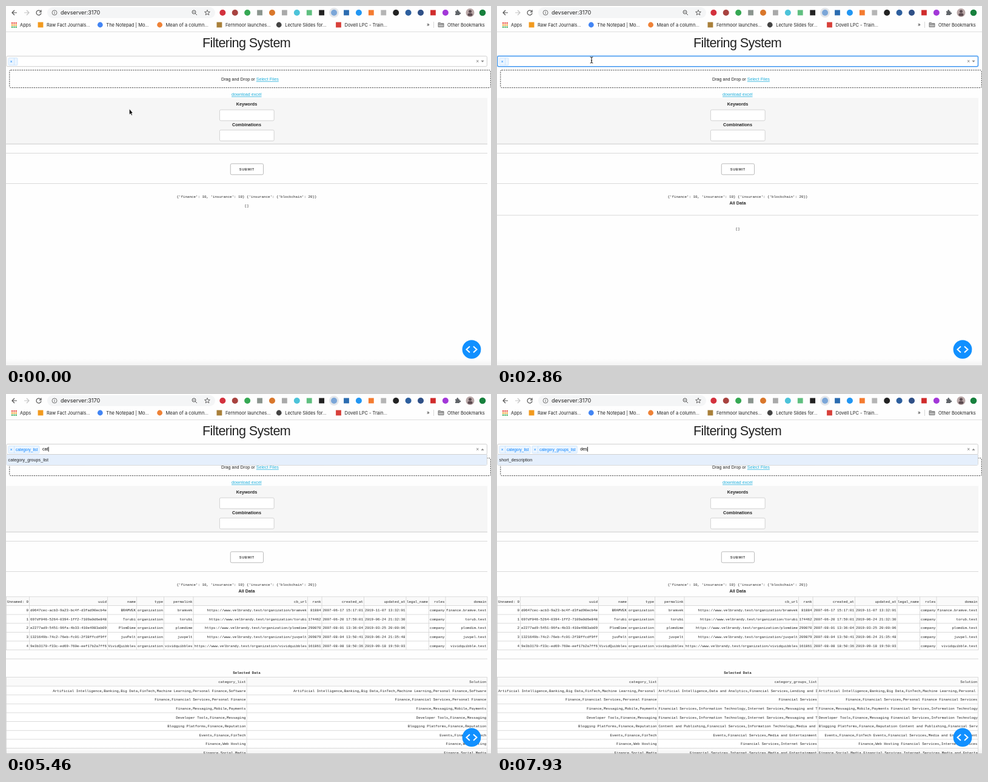
An HTML page with a canvas for the animation above (8 s loop, 800 px wide and 593 px high).

```html
<!DOCTYPE html>
<html lang="en">
<head>
<meta charset="utf-8">
<title>Filtering System</title>
<style>
html, body { margin: 0; width: 100%; height: 100%; overflow: hidden; background: #fff; }
canvas { display: block; width: 800px; height: 593px; }
</style>
</head>
<body>
<canvas id="stage"></canvas>
<script>
const W = 800, H = 593, LOOP = 8000, STEP = 130;
const SANS = '"Liberation Sans", Arial, sans-serif';
const MONO = '"Liberation Mono", "Courier New", monospace';
const UI = 'Inter, Roboto, sans-serif';
const BLUE = '#007eff', LINK = '#1eaedb', INK = '#222';
const ROW = 14.62, MONO_SIZE = 5.84;

const canvas = document.getElementById('stage');
const ctx = canvas.getContext('2d');
const ratio = window.devicePixelRatio || 1;
canvas.width = W * ratio;
canvas.height = H * ratio;

// ---------- drawing helpers ----------
function text(str, x, y, size, { font = SANS, color = INK, align = 'left', weight = 400, spacing = 0 } = {}) {
  ctx.font = `${weight} ${size}px ${font}`;
  ctx.fillStyle = color;
  ctx.textAlign = align;
  ctx.letterSpacing = spacing + 'px';
  ctx.fillText(str, x, y + size * 0.35);
  const width = ctx.measureText(str).width;
  ctx.letterSpacing = '0px';
  return width;
}

function rect(x, y, w, h, fill) {
  ctx.fillStyle = fill;
  ctx.fillRect(x, y, w, h);
}

function box(x, y, w, h, r, fill, stroke, width = 1) {
  ctx.beginPath();
  ctx.roundRect(x, y, w, h, r);
  if (fill) { ctx.fillStyle = fill; ctx.fill(); }
  if (stroke) { ctx.strokeStyle = stroke; ctx.lineWidth = width; ctx.stroke(); }
}

function disc(x, y, r, fill) {
  ctx.beginPath();
  ctx.arc(x, y, r, 0, Math.PI * 2);
  ctx.fillStyle = fill;
  ctx.fill();
}

function path(d, x, y, { fill, stroke, width = 1.2 } = {}) {
  const shape = new Path2D(d);
  ctx.save();
  ctx.translate(x, y);
  if (fill) { ctx.fillStyle = fill; ctx.fill(shape); }
  if (stroke) { ctx.strokeStyle = stroke; ctx.lineWidth = width; ctx.stroke(shape); }
  ctx.restore();
}

const rule = (y, color = '#d9d9d9') => rect(0, y, 794, 1, color);

function link(str, x, y) {
  const w = text(str, x, y, 7.2, { color: LINK });
  rect(x, y + 3.4, w, 0.7, LINK);
}

// ---------- browser bar ----------
const EXTENSIONS = [
  ['#d3313d', 0], ['#a8423f', 0], ['#35a853', 0], ['#8b958f', 1], ['#d9772b', 0], ['#a9a9a9', 1],
  ['#4cc3d9', 0], ['#5fbf7f', 1], ['#222', 1], ['#7ba6d8', 0], ['#2b6cb0', 1], ['#2196f3', 0],
  ['#f47b30', 1], ['#b5b5b5', 1], ['#222', 0], ['#2d5f9e', 0], ['#2f4f86', 0], ['#d02c2c', 1],
  ['#a237d8', 0]
];
const BOOKMARKS = [
  ['Raw Fact Journals...', '#f29a1f', 1],
  ['The Notepad | Mo...', '#4285f4', 0],
  ['Mean of a column...', '#ef8236', 0],
  ['Fernmoor launches...', '#a9803a', 1],
  ['Lecture Slides for...', '#444', 0],
  ['Dovell LPC - Train...', '#d8403a', 1]
];

function mark(x, y, color, square, r) {
  if (square) rect(x - r, y - r, 2 * r, 2 * r, color);
  else disc(x, y, r, color);
}

function drawBrowser() {
  const gray = { stroke: '#555', width: 1.2 };
  path('M4 0H-4M0-4L-4 0L0 4', 14, 11, gray);
  path('M-4 0H4M0-4L4 0L0 4', 34, 11, { stroke: '#c4c4c4' });
  path('M3.2-2.4A4 4 0 1 0 4 .6M4-4.4V-1.2H.8', 54, 11, gray);
  box(68, 2, 277, 18, 9, '#f4f5f6');
  path('M4 0A4 4 0 1 1-4 0A4 4 0 1 1 4 0M0-.8V2.2M0-2.3V-1.3', 80, 11, { stroke: '#666', width: 0.9 });
  text('devserver:3170', 90, 11, 9, { font: UI });
  path('M2-1A3 3 0 1 1-4-1A3 3 0 1 1 2-1M1.2 1.2L4 4M-2.4-1H.4', 311, 11, { stroke: '#555', width: 1 });
  path('M0-4.5L1.2-1.4L4.4-1.3L1.9.7L2.8 3.8L0 2L-2.8 3.8L-1.9.7L-4.4-1.3L-1.2-1.4Z', 332, 11,
    { stroke: '#555', width: 0.9 });

  disc(541, 11, 8, '#e3e6ea');
  EXTENSIONS.forEach(([color, square], i) => mark(357.3 + i * 20.42, 11, color, square, square ? 4.4 : 5));
  path('M-4-2H-1.5A1.5 1.5 0 1 1 1-2H3V.2A1.5 1.5 0 1 1 3 2.8V4.5H-4V2.5A1.5 1.5 0 0 0-4-.2Z', 745, 10.5,
    { fill: '#5f6368' });
  disc(765.5, 11, 7, '#b9a7a7');
  disc(765.5, 9, 2.5, '#5c4b50');
  box(761.5, 12, 8, 4.5, 2.5, '#5c4b50');
  disc(786, 11, 5.3, '#17803d');

  const dots = ['#ea4335', '#f29a1f', '#34a853'];
  for (let i = 0; i < 9; i++) rect(9 + (i % 3) * 3.3, 27 + Math.floor(i / 3) * 3.3, 2.2, 2.2, dots[Math.floor(i / 3)]);
  text('Apps', 23, 31, 7.5, { font: UI });
  BOOKMARKS.forEach(([label, color, square], i) => {
    const x = 57 + i * 98.3;
    mark(x, 31, color, square, 4.4);
    text(label, x + 10, 31, 7.5, { font: UI });
  });
  text('»', 694, 30.5, 8, { font: UI });
  rect(705, 26, 0.8, 10, '#ccc');
  path('M-4.5-3.5H-1L0-2.3H4.5V3.5H-4.5ZM-4.5-1H4.5', 717.5, 31, { fill: '#bbb', stroke: '#666', width: 0.8 });
  text('Other Bookmarks', 728, 31, 7.5, { font: UI });
  rect(0, 42, W, 1, '#dedede');
}

// ---------- page data ----------
const COLUMNS = ['Unnamed: 0', 'uuid', 'name', 'type', 'permalink', 'cb_url', 'rank',
  'created_at', 'updated_at', 'legal_name', 'roles', 'domain'];
const OPTIONS = [...COLUMNS, 'category_list', 'category_groups_list', 'short_description'];
const EDGES = [0.5, 38.5, 167.5, 215.5, 260.5, 309, 497.5, 521, 590.5, 660, 697.5, 725, 794];
const COMPANIES = [
  ['d0647cec-acb3-9a23-bc4f-d3fad90ecb4e', 'BRAMVEK', '81884', '2007-06-17 15:17:01', '2019-11-07 13:32:01', 'finance.bramve.test'],
  ['697df046-5264-0394-1ff2-7109a0d6e848', 'Torubi', '174462', '2007-06-20 17:59:01', '2019-06-24 21:32:30', 'torub.test'],
  ['e2277ad9-5451-96fa-4b33-410e4983ab09', 'PlomDime', '290070', '2007-08-01 13:36:04', '2019-03-25 20:00:06', 'plomdim.test'],
  ['1321649b-74c2-76eb-fc01-2f38ffcdf9ff', 'juvPelt', '209879', '2007-08-04 13:50:41', '2019-06-24 21:35:48', 'juvpel.test'],
  ['9e3b3170-f33c-ed69-760e-eef17b2a7ff6', 'VividQuibbles', '161861', '2007-08-08 18:50:36', '2019-09-18 19:50:03', 'vividquibble.test']
];
const COMPANY_ROWS = COMPANIES.map(([uuid, name, rank, created, updated, domain], i) => {
  const slug = name.toLowerCase();
  return [String(i), uuid, name, 'organization', slug, 'https://www.velbrandy.test/organization/' + slug,
    rank, created, updated, '', 'company', domain];
});

const FIN = 'Financial Services', MEDIA = 'Media and Entertainment', NET = 'Internet Services';
const TELECOM = `${FIN},Information Technology,${NET},Messaging and Telecommunications`;
const CATEGORIES = [
  ['Artificial Intelligence,Banking,Big Data,FinTech,Machine Learning,Personal Finance,Software',
    `Artificial Intelligence,Data and Analytics,${FIN},Lending and Investments`],
  ['Finance,Financial Services,Personal Finance', FIN],
  ['Finance,Messaging,Mobile,Payments', TELECOM],
  ['Developer Tools,Finance,Messaging', TELECOM],
  ['Blogging Platforms,Finance,Reputation', `Content and Publishing,${FIN},Information Technology,${MEDIA}`],
  ['Events,Finance,FinTech', `Events,${FIN},${MEDIA}`],
  ['Finance,Web Hosting', `${FIN},${NET}`],
  ['Finance,Social Media', `${FIN},${NET},${MEDIA}`]
];

// ---------- page parts ----------
function cell(str, left, right, y) {
  ctx.save();
  ctx.beginPath();
  ctx.rect(left, y - ROW / 2, right - left - 0.5, ROW);
  ctx.clip();
  ctx.font = `400 ${MONO_SIZE}px ${MONO}`;
  const overflows = ctx.measureText(str).width > right - left - 2;
  text(str, overflows ? left + 1.5 : right - 1.5, y, MONO_SIZE, { font: MONO, align: overflows ? 'left' : 'right' });
  ctx.restore();
}

function table(top, edges, rows) {
  const right = edges[edges.length - 1], height = rows.length * ROW;
  rect(0, top, right, height, '#fff');
  rect(0, top, right, ROW, '#fafafa');
  for (let i = 0; i <= rows.length; i++) rect(0, top + i * ROW - 0.4, right, 0.8, '#d3d3d3');
  edges.forEach(x => rect(x - 0.4, top, 0.8, height, '#d3d3d3'));
  rows.forEach((row, r) => row.forEach((str, c) => cell(str, edges[c], edges[c + 1], top + (r + 0.52) * ROW)));
}

function drawSelected(names) {
  text('Selected Data', 397, 458.7, MONO_SIZE, { font: MONO, weight: 700, align: 'center' });
  const rows = CATEGORIES.map(row => {
    const values = row.slice(0, names.length);
    return [...values, values.join(' ')];
  });
  const count = names.length + 1;
  const edges = Array.from({ length: count + 1 }, (_, i) => 0.5 + i * 793.2 / count);
  table(466.5, edges, [[...names, 'Solution'], ...rows]);
}

function drawDropzone(hover) {
  if (hover) rect(6, 106, 793, 28.5, '#e1e1e1');
  ctx.save();
  ctx.setLineDash(hover ? [] : [2.2, 1.4]);
  box(5.8, 105.6, 793.6, 29, 2, null, hover ? '#5fcc62' : '#333', hover ? 1.1 : 0.9);
  ctx.restore();
  text('Drag and Drop or', 355, 120.7, 7.2);
  link('Select Files', 412.7, 120.7);
}

function tag(label, x) {
  ctx.font = `400 6.48px ${SANS}`;
  const w = label ? ctx.measureText(label).width + 14.6 : 15;
  box(x, 85.5, w, 12, 1.2, '#ebf5ff', '#c2e0ff', 0.7);
  rect(x + 9, 85.5, 0.7, 12, '#c2e0ff');
  text('×', x + 4.7, 91.7, 6.5, { color: BLUE, align: 'center' });
  text(label, x + 12, 91.6, 6.48, { color: BLUE });
  return x + w + 3;
}

function drawSelect({ tags, query, focused, caret }) {
  const open = query !== '';
  const blue = focused && !open;
  if (blue) box(0.8, 82.6, 792.6, 17, 2, null, 'rgba(0,126,255,.2)', 3);
  box(0.8, 82.6, 792.6, 17, 2, '#fff', blue ? '#3b93ee' : '#c4c4c4', blue ? 1.2 : 0.8);
  let x = 4;
  for (const label of tags) x = tag(label, x);
  x += 2;
  const w = text(query, x, 90.8, 7.2, { color: '#000' });
  if (caret) rect(x + w + (open ? 0.2 : -0.4), 87, 0.8, 8, '#000');
  if (tags.length) text('×', 777.7, 91.3, 8.5, { color: '#777', align: 'center' });
  path(open ? 'M-2.6 1.5L0-1.5L2.6 1.5Z' : 'M-2.6-1.5H2.6L0 1.5Z', 786, 91.3, { fill: '#888' });
  if (!open) return;

  const matches = OPTIONS.filter(name => name.includes(query) && !tags.includes(name)).slice(0, 5);
  box(0.8, 100, 792.6, matches.length * 17.4, [0, 0, 2, 2], '#fff', '#ccc', 0.8);
  matches.forEach((name, i) => {
    const y = 100 + i * 17.4;
    if (i === 0) rect(1.2, y, 791.8, 17, '#e5effc');
    text(name, 3.6, y + 8.5, 7.2);
  });
}

function drawForm() {
  link('download excel', 372, 145.6);
  rect(0.5, 151.5, 793.5, 76, '#f6f6f6');
  rule(226.8, '#ccc');
  const bold = { weight: 700, align: 'center' };
  text('Keywords', 397, 161.8, 7.2, bold);
  text('Combinations', 397, 195.2, 7.2, bold);
  for (const y of [171, 204.3]) box(352.4, y, 89.8, 17.9, 2, '#fff', '#c8c8c8', 0.8);
  rule(242);
  box(370.3, 259.8, 54.2, 18, 2, '#fff', '#aaa', 0.8);
  text('SUBMIT', 384.8, 268.9, 5.6, { weight: 700, spacing: 0.6, color: '#444' });
  rule(292);
  text("{'finance': 10, 'insurance': 10} {'insurance': {'blockchain': 20}}", 397, 313.8, MONO_SIZE,
    { font: MONO, align: 'center' });
}

function drawResults({ heading, loaded, columns }) {
  let y = 329;
  if (heading) {
    text('All Data', 397, 324, 7.2, { weight: 700, align: 'center' });
    if (loaded) table(333.9, EDGES, [COLUMNS, ...COMPANY_ROWS]);
    rule(loaded ? 435.8 : 344.2);
    y = loaded ? 459.3 : 366.8;
  }
  if (columns.length) drawSelected(columns);
  else text('[]', 397, y, MONO_SIZE, { font: MONO, align: 'center' });
}

function drawPointer({ x, y, beam }) {
  if (beam) path('M-2.3-5Q0-5 0-3.5Q0-5 2.3-5M0-3.5V3.5M-2.3 5Q0 5 0 3.5Q0 5 2.3 5M-1 1H1', x, y, { stroke: '#111', width: 1 });
  else path('M0-4.5V5L2.1 3.1L3.5 6.2L5 5.5L3.6 2.5H6Z', x - 0.6, y, { fill: '#000', stroke: '#fff', width: 0.6 });
}

// ---------- timeline ----------
const TYPING = [[0, ''], [3900, 'c'], [4030, 'ca'], [4160, 'cat'], [4420, ''], [5200, 'c'], [5330, 'ca'],
  [5460, 'cat'], [5720, ''], [7540, 'd'], [7800, 'de'], [7930, 'des']];
const TAGS = [[0, ['']], [3510, []], [4420, ['category_list']], [5720, ['category_list', 'category_groups_list']]];
const RESULTS = [[0, []], [4940, ['category_list']], [5850, ['category_list', 'category_groups_list']]];
const POINTER = [[130, 204, 174], [910, 300, 150], [1300, 352, 122], [1560, 352, 122], [2210, 156, 89]];

const latest = (track, t) => track.filter(([start]) => start <= t).pop()[1];

function pointerAt(t) {
  let [, x, y] = POINTER[0];
  for (let i = 1; i < POINTER.length; i++) {
    const [t0, x0, y0] = POINTER[i - 1], [t1, x1, y1] = POINTER[i];
    if (t < t0) break;
    const k = Math.min(1, (t - t0) / (t1 - t0)), e = k * k * (3 - 2 * k);
    x = x0 + (x1 - x0) * e;
    y = y0 + (y1 - y0) * e;
  }
  return { x, y, beam: y < 99 };
}

function draw(t) {
  const pointer = pointerAt(t), query = latest(TYPING, t), focused = t >= 2210;
  const blinkOn = Math.floor((t - 2210) / 520) % 2 === 0;
  ctx.setTransform(ratio, 0, 0, ratio, 0, 0);
  rect(0, 0, W, H, '#fefefe');
  drawBrowser();
  text('Filtering System', 324, 60.5, 21.6, { spacing: -0.6 });
  drawDropzone(t < 1560 && pointer.y < 135);
  drawForm();
  drawResults({ heading: t >= 1820, loaded: t >= 3250, columns: latest(RESULTS, t) });
  drawSelect({ tags: latest(TAGS, t), query, focused, caret: focused && (query !== '' || blinkOn) });

  const shade = ctx.createLinearGradient(0, 581, 0, H);
  shade.addColorStop(0, 'rgba(0,0,0,0)');
  shade.addColorStop(1, 'rgba(0,0,0,.05)');
  rect(0, 581, W, 12, shade);
  rect(0, 592, W, 1, '#c9c9c9');
  disc(768, 565.7, 15.4, '#1190ff');
  path('M-3-5L-8.5 0L-3 5M3-5L8.5 0L3 5', 768, 565.7, { stroke: '#fff', width: 2 });
  if (t < 3510) drawPointer(pointer);
}

let shown = -1;
function tick() {
  const step = Math.floor((performance.now() % LOOP) / STEP);
  if (step !== shown) draw((shown = step) * STEP);
  requestAnimationFrame(tick);
}
tick();
</script>
</body>
</html>
```
